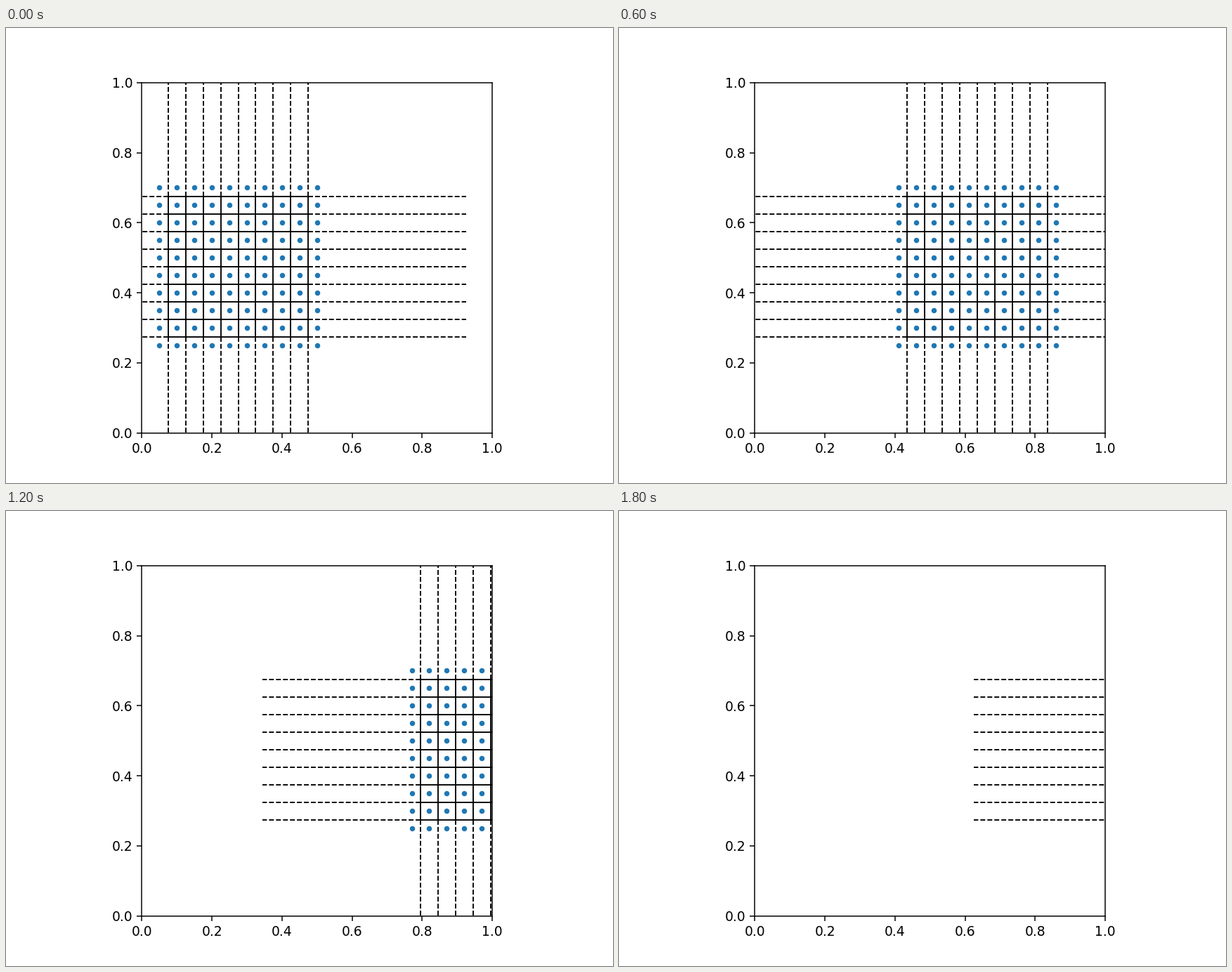
A matplotlib script for the animation above (2 s loop, 864 by 648 pixels).

```python
import numpy as np
import matplotlib.pyplot as plt
from matplotlib.animation import FuncAnimation
from matplotlib.collections import LineCollection

FRAMES = 10
INTERVAL = 200
COUNT = 10           # dots per side
GAP = 0.05           # spacing between dots
START = (0.05, 0.25)
STEP, TRAVEL = 0.12, 1.0
RAY = GAP * (COUNT - 1)

fig, ax = plt.subplots(figsize=(6.4, 4.8), dpi=135)
ax.set_aspect("equal")
ax.set(xlim=(0, 1), ylim=(0, 1))

dots, = ax.plot([], [], ".", color="C0")
edges = LineCollection([], colors="k", linewidths=1.0, linestyles="solid")
rays = LineCollection([], colors="k", linewidths=1.0, linestyles="dashed")
ax.add_collection(edges, autolim=False)
ax.add_collection(rays, autolim=False)


def cell_edges(xs, ys):
    """Finite borders between neighbouring cells."""
    across = [[(a, y), (b, y)] for y in ys for a, b in zip(xs, xs[1:])]
    upright = [[(x, a), (x, b)] for x in xs for a, b in zip(ys, ys[1:])]
    return across + upright


def outer_rays(xs, ys):
    """Open borders, drawn outwards from the rim of the lattice."""
    segments = []
    for end, sign in ((0, -1), (-1, 1)):
        x, y = xs[end], ys[end]
        segments += [[(x, v), (x + sign * RAY, v)] for v in ys]
        segments += [[(u, y), (u, y + sign * RAY)] for u in xs]
    return segments


def update(i):
    shift = min(STEP * i, TRAVEL)
    px = START[0] + shift + GAP * np.arange(COUNT)
    py = START[1] + GAP * np.arange(COUNT)
    gx, gy = np.meshgrid(px, py)
    dots.set_data(gx.ravel(), gy.ravel())

    xs, ys = px[:-1] + GAP / 2, py[:-1] + GAP / 2
    edges.set_segments(cell_edges(xs, ys))
    rays.set_segments(outer_rays(xs, ys))
    return dots, edges, rays


anim = FuncAnimation(fig, update, frames=FRAMES, interval=INTERVAL,
                     repeat=True, repeat_delay=0)
plt.show()
```
